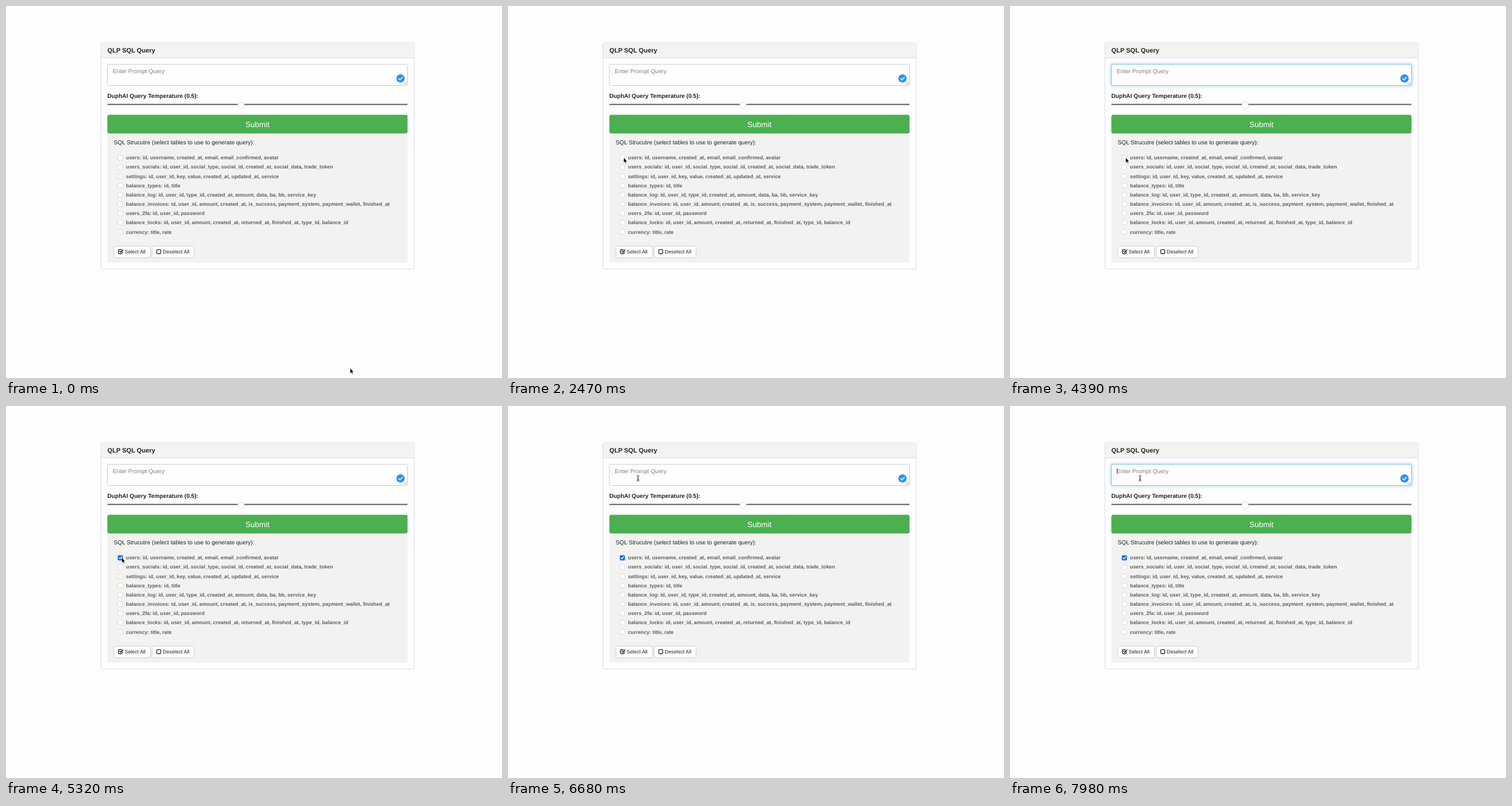
Recreate the animation shown at these times as an HTML page. Size 864 by 648 pixels, loop 8 s.

```html
<!DOCTYPE html>
<html lang="en">
<head>
<meta charset="utf-8">
<title>SQL query form</title>
<style>
  html, body { margin: 0; width: 100%; height: 100%; overflow: hidden; background: #fdfdfc; }
  svg { display: block; width: 864px; height: 648px; font-family: "Liberation Sans", Arial, sans-serif; fill: #222; text-rendering: geometricPrecision; }
  .bold { font-weight: bold; }
  .body { font-size: 10.13px; }
  .small { font-size: 8.9px; }
  .row { font-size: 8.84px; font-weight: bold; fill: #606060; }
  .line { fill: none; stroke-linecap: round; stroke-linejoin: round; }
</style>
</head>
<body>
<svg viewBox="0 0 864 648">
  <defs>
    <filter id="blur" x="-5%" y="-50%" width="110%" height="200%"><feGaussianBlur stdDeviation="2"/></filter>
  </defs>

  <rect x="165.5" y="64" width="545.5" height="394" rx="3" fill="#fefefe" stroke="#dcdce4"/>
  <path d="M166 90.5V67q0-2.5 2.5-2.5H708q2.5 0 2.5 2.5v23.5z" fill="#f3f3f1"/>
  <path d="M166 90.5h544.5" stroke="#dddde0"/>
  <text class="bold" x="176.5" y="81" font-size="11.1">QLP SQL Query</text>

  <rect id="glow" x="176" y="101" width="524" height="38" rx="4" fill="none" stroke="#66afe9" stroke-width="4" filter="url(#blur)"/>
  <rect x="176.5" y="101.5" width="523" height="37" rx="3" fill="#fefefe" stroke="#c9c9d3"/>
  <rect id="focusRing" x="176.5" y="101.5" width="523" height="37" rx="3" fill="none" stroke="#7cbcec"/>
  <text class="body" x="186" y="117" fill="#808080">Enter Prompt Query</text>
  <path id="caret" d="M186.5 108v10.5" stroke="#333" stroke-width=".8"/>
  <path d="M693 137l5-5m-2 5l2-2" stroke="#888" stroke-width=".8"/>
  <circle cx="687.2" cy="126.2" r="7.3" fill="#2f94f0"/>
  <path class="line" d="M684 126.5l2.3 2.2 4.2-4.5" stroke="#fff" stroke-width="1.4"/>

  <text class="body bold" x="176.5" y="160">DuphAI Query Temperature (0.5):</text>
  <rect x="176.5" y="170.4" width="523" height="2.2" rx="1" fill="#5c5c58"/>
  <circle cx="409.5" cy="173" r="5.7" fill="#fff" stroke="#d0d0d0" stroke-width=".8"/>

  <rect x="176.5" y="222" width="523" height="225" fill="#f2f2f0"/>
  <rect id="submit" x="176.5" y="189.5" width="523" height="32.5" rx="3.5"/>
  <text x="438" y="210.7" font-size="13.5" fill="#fff" text-anchor="middle">Submit</text>
  <text class="body" x="187.5" y="240.5">SQL Strucutre (select tables to use to generate query):</text>
  <g id="tables"></g>
  <g id="check">
    <rect x="194.7" y="260" width="9" height="9" rx="1.8" fill="#1573e8"/>
    <path class="line" d="M197 264.7l1.6 1.7 3-4" stroke="#fff" stroke-width="1.3"/>
  </g>

  <g fill="#fff" stroke="#ccc">
    <rect x="188" y="418" width="63.5" height="20.5" rx="2.5"/>
    <rect x="254.5" y="418" width="73" height="20.5" rx="2.5"/>
  </g>
  <g class="line" stroke="#222" stroke-width="1.3">
    <path d="M202.5 428v2q0 1.5-1.5 1.5h-3.8q-1.5 0-1.5-1.5v-4q0-1.5 1.5-1.5h3.8"/>
    <path d="M198 427.2l1.8 1.8 4-4.3" stroke-width="1.5"/>
    <rect x="262.6" y="424.3" width="7" height="7.2" rx="1.5"/>
  </g>
  <text class="small" x="206.5" y="431.3">Select All</text>
  <text class="small" x="273" y="431.3">Deselect All</text>

  <path id="arrow" d="M0 0v9.2l2.1-1.9 1.5 3.3 1.4-.6-1.4-3.2h2.8z" fill="#000" stroke="#fff" stroke-width=".6"/>
  <path id="beam" class="line" d="M-2-4.5q2 0 2 1.5v6q0 1.5-2 1.5M2-4.5q-2 0-2 1.5v6q0 1.5 2 1.5M-1 1.5h2" stroke="#222"/>
</svg>
<script>
const LOOP = 8000;
const $ = id => document.getElementById(id);

const tables = [
  'users: id, username, created_at, email, email_confirmed, avatar',
  'users_socials: id, user_id, social_type, social_id, created_at, social_data, trade_token',
  'settings: id, user_id, key, value, created_at, updated_at, service',
  'balance_types: id, title',
  'balance_log: id, user_id, type_id, created_at, amount, data, ba, bb, service_key',
  'balance_invoices: id, user_id, amount, created_at, is_success, payment_system, payment_wallet, finished_at',
  'users_2fa: id, user_id, password',
  'balance_locks: id, user_id, amount, created_at, returned_at, finished_at, type_id, balance_id',
  'currency: title, rate'
];
$('tables').innerHTML = tables.map((label, i) => {
  const y = 264.3 + i * 16.15;
  return `<rect x="195" y="${y - 4.2}" width="8.4" height="8.4" rx="1.8" fill="#fdfdfd" stroke="#d2d2d6" stroke-width=".8"/>
    <text class="row" x="209" y="${y + 3}">${label}</text>`;
}).join('');

// Pointer path: [time, x, y]
const path = [
  [0, 599.5, 631], [20, 599.5, 631], [420, 346, 314], [590, 346, 314],
  [830, 273.5, 223.5], [880, 273.5, 223.5], [1350, 230, 245], [1800, 202, 271],
  [2150, 201.5, 264], [2570, 201.5, 264], [2800, 226, 126], [3250, 226, 126],
  [3800, 201.5, 264], [5750, 201.5, 264], [6160, 219.5, 164.5],
  [6260, 219.5, 164.5], [6550, 226.5, 126], [LOOP, 226.5, 126]
];
const ramp = (t, start, length) => Math.min(1, Math.max(0, (t - start) / length));

function pointer(t) {
  const i = Math.max(1, path.findIndex(p => p[0] >= t));
  const [t0, x0, y0] = path[i - 1], [t1, x1, y1] = path[i];
  const k = ramp(t, t0, t1 - t0);
  return [x0 + (x1 - x0) * k, y0 + (y1 - y0) * k];
}

function draw(t) {
  const [x, y] = pointer(t);
  const typing = y > 101 && y < 139;
  for (const id of ['arrow', 'beam']) $(id).setAttribute('transform', `translate(${x} ${y})`);
  $('arrow').style.display = typing ? 'none' : '';
  $('beam').style.display = typing ? '' : 'none';

  const focus = ramp(t, 2850, 150) - ramp(t, 4500, 150) + ramp(t, 7320, 150);
  $('glow').style.opacity = focus * .35;
  $('focusRing').style.opacity = focus;
  const blink = t >= 2850 && t < 4500 && (t - 2850) % 1000 < 500;
  $('caret').style.display = blink || t >= 7320 ? '' : 'none';
  $('check').style.display = t >= 4500 ? '' : 'none';

  // The hover colour trails the pointer slightly.
  const hoverY = pointer(Math.max(0, t - 130))[1];
  $('submit').setAttribute('fill', hoverY > 189 && hoverY < 222 ? '#388e3c' : '#4caf50');
}

function tick() {
  draw(performance.now() % LOOP);
  requestAnimationFrame(tick);
}
tick();
</script>
</body>
</html>
```
